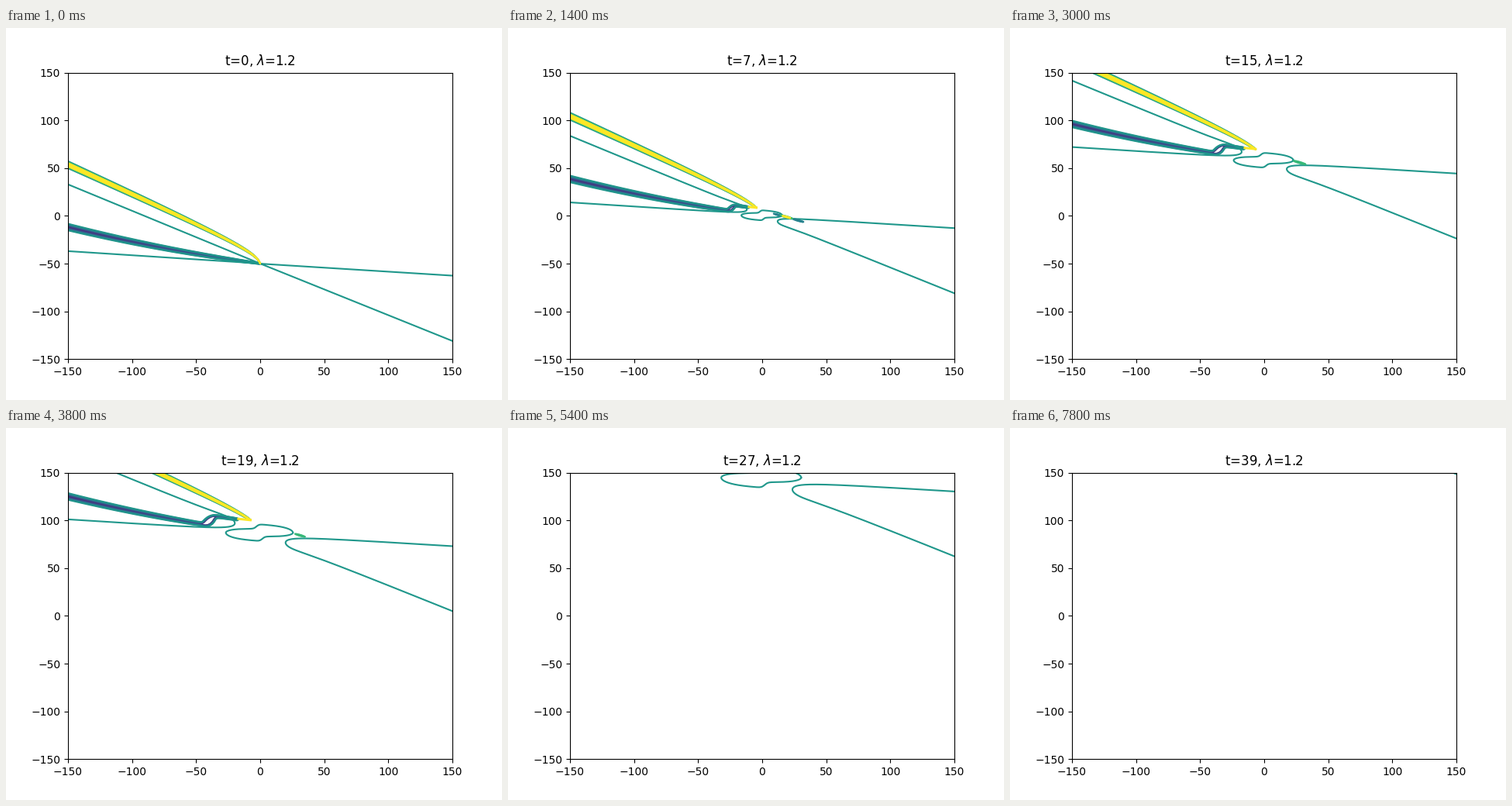
Animation of 640x480 px, one loop 8 s. Source, as a matplotlib script:

```python
import numpy as np
import matplotlib.pyplot as plt
from matplotlib.animation import FuncAnimation

FRAMES, INTERVAL = 40, 200
LAMBDA = 1.2
SPEED = 5 * LAMBDA ** 2
EDGE = 156                      # a little beyond the axes limit
LAST_RIDGE = 27                 # the left ridges have left the axes by then
VIRIDIS = plt.get_cmap('viridis')
TEAL, GREEN, YELLOW = VIRIDIS(.53), VIRIDIS(.67), VIRIDIS(1.)
LEVELS = np.linspace(.2, 1, 6)
LEVEL_COLORS = VIRIDIS(np.linspace(.12, .52, 6))
GX, GY = np.meshgrid(np.linspace(-152, 2, 207), np.linspace(-6, 48, 91))


def step(x, width):
    return .5 + .5 * np.tanh(x / width)


def wedge(s, steep, flat):
    """Right branch of a hyperbola between two lines, with a sagging tip."""
    c = 2.27 * s
    reach = np.arccosh(EDGE / (2 * c))
    w = np.linspace(-reach, reach, 400)
    x = 2 * c * np.cosh(w)
    y = c * (steep * np.exp(w) + flat * np.exp(-w))
    return x, y - s * (.2 + 1 / np.cosh(w - .6) ** 2)


def oval(s):
    """Flat ring with one hump above and its mirror image below."""
    a = np.linspace(0, 2 * np.pi, 400)
    side = np.sign(np.sin(a))
    x = 6 * np.cos(a)
    u = side * x
    hump = 1.1 * step(u + .5, .5) * (1 - u / 9)
    y = side * np.sqrt(1 - np.cos(a) ** 4) * (.92 + hump)
    return s * (x - .15), s * (y + .08)


def draw_zero_lines(ax, t, s, cy):
    rx, ry = wedge(s, -.54, -.084)
    lx, ly = wedge(s, -.553, -.087)
    curves = [(rx, ry), (-lx, -ly)]
    if t:
        curves.append(oval(s))
    for x, y in curves:
        ax.plot(x, y + cy, color=TEAL)


def draw_trough(ax, t, s, cy):
    """Dark band: a bent line that steps up near the centre."""
    px = np.linspace(-EDGE, -4.2 * s, 220)
    py = -.18 * px + .0005 * px ** 2 + 2.5 * s * step(px / s + 9, .8)
    width = .27 * np.sqrt(4 - px)
    hollow = .11 * t * np.exp(-((px / s + 9.2) / .9) ** 2)
    q = np.full(GX.shape, 9.)
    for x, y, w, h in zip(px, py, width, hollow):
        np.minimum(q, (np.hypot(GX - x, GY - y) - h) / w, out=q)
    ax.contour(GX, GY + cy, q, levels=LEVELS, colors=LEVEL_COLORS)


def draw_ridge(ax, t, s, cy):
    """Bright band that thins towards its tip and hooks back."""
    tip = 1.75 * s
    a = tip + (EDGE - tip) * np.linspace(0, 1, 200) ** 2
    mid = .59 * a + 3 * np.log(1 + a) + .0075 * t ** 2 + cy
    half = .3 * np.sqrt(a - tip) + .02 * t * (1 - np.exp(tip - a))
    for f, color in ((1, TEAL), (.78, GREEN), (.5, YELLOW), (.15, YELLOW)):
        for side in (f, -f):
            ax.plot(-a, mid + side * half, color=color)
    if t:
        ax.plot([-tip, -3.9 * s], [cy + 3.1 * s, cy + 3.4 * s],
                color=YELLOW, lw=2.2)


def sliver(ax, x, y, length, color):
    a = np.linspace(0, 2 * np.pi, 60)
    for k in (1, .5):
        dx = k * length * np.cos(a)
        dy = k * .16 * length * np.sin(a) - .38 * dx
        ax.plot(x + dx, y + dy, color=color)


def draw_slivers(ax, t, s, cy):
    x, y = 7.1 * s, cy - .55 * s
    if 0 < t < 13:
        fade = min(1, (13 - t) / 3)
        sliver(ax, x - 2.6 * s, y + .85 * s, 3 * fade, LEVEL_COLORS[-2])
        sliver(ax, x + 3.5 * s, y - 1.4 * s, 4 * fade, LEVEL_COLORS[-2])
    if 0 < t < 27:
        size = min(1, (27 - t) / 12) ** .5
        sliver(ax, x, y, 4.6 * size, GREEN)
        if t < 13:
            sliver(ax, x, y, 3, YELLOW)


def draw(t):
    ax.clear()
    cy = -50 + SPEED * t
    s = max(np.sqrt(t), .05)
    if t <= LAST_RIDGE:
        draw_trough(ax, t, s, cy)
    draw_zero_lines(ax, t, s, cy)
    draw_slivers(ax, t, s, cy)
    if t <= LAST_RIDGE:
        draw_ridge(ax, t, s, cy)
    ax.set(xlim=(-150, 150), ylim=(-150, 150))
    ax.set_title(rf't={t}, $\lambda$={LAMBDA}', pad=6.7)


fig, ax = plt.subplots(figsize=(6.4, 4.8), dpi=100)
anim = FuncAnimation(fig, draw, frames=FRAMES, interval=INTERVAL,
                     init_func=lambda: draw(0), repeat=True, repeat_delay=0)
plt.show()
```
